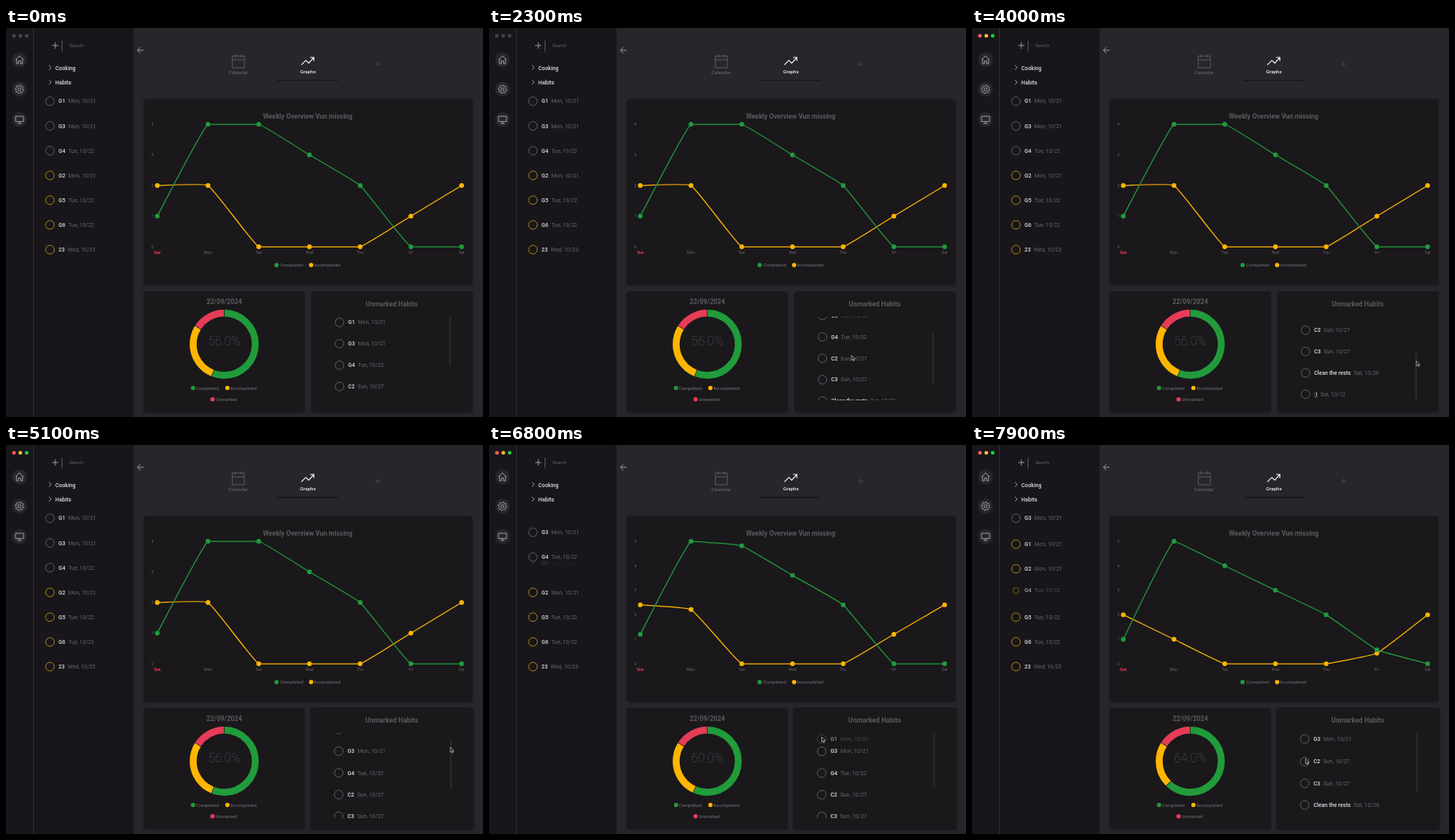
Recreate the animation shown at these times as an HTML page. Size 600 by 489 pixels, loop 8 s.

```html
<!DOCTYPE html>
<html lang="en">
<head>
<meta charset="utf-8">
<title>Habit graphs</title>
<style>
  html, body { margin: 0; width: 100%; height: 100%; overflow: hidden; background: #28262b; }
  svg { display: block; width: 100vw; height: 100vh; font-family: Roboto, Inter, sans-serif; }
  .row { font-size: 6.9px; fill: #67656a; }
  .name { font-weight: 500; fill: #dedde0; }
  .title { font-size: 8.4px; font-weight: 700; fill: #5b595d; text-anchor: middle; }
  .legend { font-size: 5.9px; font-weight: 500; fill: #626065; }
  .tick { font-size: 5px; fill: #68666b; }
  .pct { font-size: 15.6px; font-weight: 100; fill: #5a585d; text-anchor: middle; }
  .icon { fill: none; stroke: #b9b8bc; stroke-width: .8; }
  .dim { stroke: #69676c; }
</style>
</head>
<body>
<svg viewBox="0 0 600 489" preserveAspectRatio="none">
  <defs>
    <clipPath id="listClip"><rect x="400" y="363" width="175" height="105"/></clipPath>
    <filter id="shade" x="-5%" y="-5%" width="110%" height="112%" color-interpolation-filters="sRGB">
      <feDropShadow dx="0" dy="1" stdDeviation="1.5" flood-color="#000" flood-opacity=".25"/>
    </filter>
  </defs>
  <g id="base"></g>
  <g id="live"></g>
</svg>
<script>
const LOOP = 8000;
const GREEN = '#219b3b', YELLOW = '#ffb602', RED = '#e63c58', PANEL = '#1a181b';
const CHECKS = [6750, 7710];

// Chart data before, between and after the two checks
const STAGES = [
  { max: 4, done: [1, 4, 4, 3, 2, 0, 0], open: [2, 2, 0, 0, 0, 1, 2], pct: 56, thumb: 62.5 },
  { max: 5, done: [1, 5, 4, 3, 2, 0, 0], open: [2, 1, 0, 0, 0, 1, 2], pct: 60, thumb: 70 },
  { max: 5, done: [1, 5, 4, 3, 2, 1, 0], open: [2, 1, 0, 0, 0, 0, 2], pct: 64, thumb: 73.5 }
];
const SIDE = ['G1 G3 G4 G2 G5 G6 23', 'G3 G4 G1 G2 G5 G6 23', 'G3 G1 G2 G4 G5 G6 23'].map(s => s.split(' '));
const OPEN_COUNT = [3, 2, 1];
const TODO = ['G1', 'G3', 'G4', 'C2', 'C3', 'Clean the rests', ':)'];
const CHECKED = ['G1', 'G4'];
const DATES = {
  G1: 'Mon, 10/21', G2: 'Mon, 10/21', G3: 'Mon, 10/21', G4: 'Tue, 10/22', G5: 'Tue, 10/22',
  G6: 'Tue, 10/22', 23: 'Wed, 10/23', C2: 'Sun, 10/27', C3: 'Sun, 10/27',
  'Clean the rests': 'Sat, 10/26', ':)': 'Sat, 10/12'
};

// Steps: time, then values
const POINTER = [
  [450, 440, 492], [1250, 456, 411.5], [2950, 456, 411.5], [3600, 559, 418.5], [4600, 559, 418.5],
  [5200, 559, 377], [5400, 559, 377], [5850, 454.5, 387], [6150, 454.5, 387], [6550, 418.5, 367],
  [6800, 418.5, 367], [7150, 421.5, 388], [7450, 419.5, 394.5]
];
const SCROLL = [
  [1900, 0], [2100, 14], [2300, 35.5], [2600, 58], [2900, 69], [3100, 71], [4600, 71], [5200, 0]
];
const HOVER = [[4550, 1], [4700, 1.0148]];

const clamp = (v, lo = 0, hi = 1) => Math.min(hi, Math.max(lo, v));
const mix = (a, b, p) => a + (b - a) * p;
const smooth = p => p * p * (3 - 2 * p);
const quart = p => 1 - (1 - p) ** 4;
const cubic = p => 1 - (1 - p) ** 3;

function track(steps, t, ease = p => p) {
  const i = steps.findIndex(s => s[0] > t);
  if (i === 0) return steps[0].slice(1);
  if (i < 0) return steps[steps.length - 1].slice(1);
  const [a, b] = [steps[i - 1], steps[i]];
  const p = ease((t - a[0]) / (b[0] - a[0]));
  return a.slice(1).map((v, k) => mix(v, b[k + 1], p));
}

const text = (x, y, str, cls, extra = '') => `<text x="${x}" y="${y}" class="${cls}" ${extra}>${str}</text>`;
const path = (d, cls = 'icon', extra = '') => `<path d="${d}" class="${cls}" ${extra}/>`;
const dot = (x, y, r, fill) => `<circle cx="${x}" cy="${y}" r="${r}" fill="${fill}"/>`;
const ring = (x, y, r, color) =>
  `<circle cx="${x}" cy="${y}" r="${r}" fill="none" stroke="${color}" stroke-width=".8"/>`;
const box = (x, y, w, h, fill, extra = '') =>
  `<rect x="${x}" y="${y}" width="${w}" height="${h}" fill="${fill}" ${extra}/>`;
const card = (x, y, w, h) => box(x, y, w, h, PANEL, 'rx="4" filter="url(#shade)"');
const legend = (x, y, gap, str, color) => dot(x, y, 2.7, color) + text(x + gap, y + 2, str, 'legend');

function row(x, y, name, color, r = 5.4, alpha = 1) {
  const label = `<tspan class="name">${name}</tspan><tspan dx="3.7">${DATES[name]}</tspan>`;
  return `<g opacity="${alpha}">${ring(x, y, r, color)}${text(x + 10.7, y + 2.4, label, 'row')}</g>`;
}

function gear(cx, cy) {
  const pts = [];
  for (let i = 0; i < 32; i++) {
    const r = i % 4 < 2 ? 5.4 : 4.1, a = (i + .5) * Math.PI / 16;
    pts.push(`${(cx + r * Math.cos(a)).toFixed(2)} ${(cy + r * Math.sin(a)).toFixed(2)}`);
  }
  return path(`M${pts.join('L')}Z`) + `<circle cx="${cx}" cy="${cy}" r="1.9" class="icon"/>`;
}

function drawBase() {
  return box(0, 0, 600, 489, '#28262b')
    + box(0, 0, 160.5, 489, '#18161a') + box(34, 0, 1, 489, '#302e33') + box(160, 0, 1, 489, '#222025')
    + [40, 77, 115].map(y => dot(17, y, 9.4, '#28262b')).join('')
    + path('M12 40L17 35L22 40M13.2 39V45H15.6V41.5H18.4V45H20.8V39')
    + gear(17, 77)
    + path('M12 111H22V117.6H12ZM17 117.6V120M14.5 120H19.5')
    + path('M58 22H66M62 18V26') + path('M70.5 16V29.5', 'icon dim')
    + text(79.5, 24.3, 'Search', 'legend', 'style="font-weight:400"')
    + [['Cooking', 50], ['Habits', 68.5]].map(([s, y]) =>
        path(`M54 ${y - 3.2}L57 ${y - .4}L54 ${y + 2.4}`) + text(62, y + 2.8, s, 'row name')).join('')
    + path('M173 28H165.5M169 24.3L165.3 28L169 31.7')
    + path('M284.7 35.2H299.8V50H284.7ZM284.7 40H299.8M288.5 33V37M296 33V37', 'icon dim')
    + text(292, 58.3, 'Calendar', 'legend', 'text-anchor="middle" style="font-size:6.1px"')
    + path('M371.5 46.3L377.2 40.7L380.8 44.2L387 37.3M382.6 37H387.2V41.6', 'icon', 'style="stroke:#fff;stroke-width:1.1"')
    + text(379.8, 57.3, 'Graphs', 'legend', 'text-anchor="middle" style="font-size:6.1px;fill:#f0f0f2"')
    + box(341, 65.5, 77, 1, '#111013')
    + path('M464 45.3H471M467.5 41.8V48.8', 'icon', 'style="stroke:#4d4b50"')
    + card(173, 89.5, 414, 233.5) + card(173, 331, 203, 152)
    + text(379.5, 114.3, 'Weekly Overview Vun missing', 'title')
    + text(274.5, 346.5, '22/09/2024', 'title')
    + legend(340.3, 298, 4.7, 'Completed', GREEN) + legend(383.8, 298, 3.9, 'Incompleted', YELLOW)
    + legend(235.2, 452.5, 3.6, 'Completed', GREEN) + legend(278.5, 452.5, 3.9, 'Incompleted', YELLOW)
    + legend(259.8, 466.8, 3.9, 'Unmarked', RED);
}

const TOP = 121, BOTTOM = 275;
const plotX = i => 190.3 + 63.8 * i;
const plotY = (v, max) => BOTTOM - v / max * (BOTTOM - TOP);

// Spline with handles held inside the plot area
function spline(pts, tension = .1) {
  const handles = pts.map((p, i) => {
    const a = pts[Math.max(0, i - 1)], b = pts[Math.min(pts.length - 1, i + 1)];
    const d1 = Math.hypot(p[0] - a[0], p[1] - a[1]), d2 = Math.hypot(b[0] - p[0], b[1] - p[1]);
    const at = (k, sign) => [
      p[0] + sign * k * (b[0] - a[0]),
      clamp(p[1] + sign * k * (b[1] - a[1]), TOP, BOTTOM)
    ];
    return [at(tension * d1 / (d1 + d2), -1), at(tension * d2 / (d1 + d2), 1)];
  });
  return pts.slice(1).reduce((d, p, i) => `${d}C${handles[i][1]} ${handles[i + 1][0]} ${p}`, `M${pts[0]}`);
}

function drawChart(from, to, p) {
  const line = (key, color) => {
    const pts = to[key].map((v, i) =>
      [plotX(i), mix(plotY(from[key][i], from.max), plotY(v, to.max), p)]);
    return path(spline(pts), '', `fill="none" stroke="${color}" stroke-width="1.25"`)
      + pts.map(([x, y]) => dot(x, y, 2.95, color)).join('');
  };
  let out = box(190, 274.7, 383, .6, '#111013');
  for (let v = 0; v <= to.max; v++)
    out += text(185.6, plotY(v, to.max) + 1.7, v, 'tick', 'text-anchor="end"');
  ['Sun', 'Mon', 'Tue', 'Wed', 'Thu', 'Fri', 'Sat'].forEach((day, i) => {
    const look = i ? '' : `style="fill:${RED};font-weight:700"`;
    out += text(plotX(i), 284, day, 'tick', `text-anchor="middle" ${look}`);
  });
  return out + line('open', YELLOW) + line('done', GREEN);
}

function drawDonut(from, to, p) {
  const split = mix(from.pct, to.pct, p);
  const arc = (a, b, color) => `<circle cx="274.5" cy="397.5" r="39.1" fill="none" stroke="${color}"
    stroke-width="8.7" pathLength="100" stroke-dasharray="${b - a - .3} 100"
    stroke-dashoffset="${-a - .15}" transform="rotate(-90 274.5 397.5)"/>`;
  return arc(0, split, GREEN) + arc(split, 84, YELLOW) + arc(84, 100, RED)
    + text(274.5, 398.6, to.pct.toFixed(1) + '%', 'pct');
}

function drawSide(stage, dt) {
  const slot = i => 92 + 31.1 * i;
  const before = SIDE[Math.max(0, stage - 1)];
  return SIDE[stage].map((name, i) => {
    const color = i < OPEN_COUNT[stage] ? '#6f6d72' : '#d59d16';
    if (stage && name === CHECKED[stage - 1]) {
      const s = clamp(dt / 280);
      return row(55.3, slot(i) - 7 * (1 - s), name, color, 5.4 * s, s);
    }
    return row(55.3, mix(slot(before.indexOf(name)), slot(i), cubic(clamp(dt / 300))), name, color);
  }).join('');
}

function drawList(stage, dt, t) {
  const [scroll] = track(SCROLL, t);
  const [zoom] = track(HOVER, t);
  const slide = cubic(clamp(dt / 300));
  const slot = i => 370 + 26.9 * i - scroll;
  const left = n => TODO.filter(name => !CHECKED.slice(0, n).includes(name));
  const now = left(stage), before = left(Math.max(0, stage - 1));
  let rows = now.map((name, i) =>
    row(419.5, mix(slot(before.indexOf(name)), slot(i), slide), name, '#6f6d72')).join('');
  if (stage && dt < 120) {
    const name = CHECKED[stage - 1];
    rows += row(419.5, slot(before.indexOf(name)), name, '#6f6d72', 5.4, 1 - dt / 120);
  }
  const thumb = mix(STAGES[Math.max(0, stage - 1)].thumb, STAGES[stage].thumb, slide);
  return `<g transform="translate(485.5 407) scale(${zoom}) translate(-485.5 -407)">`
    + card(384, 331, 203, 152) + text(485.2, 349.8, 'Unmarked Habits', 'title')
    + `<g clip-path="url(#listClip)">${rows}</g>`
    + box(557.6, 363 + scroll * .6, 2, thumb, '#2d2b30', 'rx="1"') + '</g>';
}

function drawPointer(t) {
  if (t < POINTER[0][0]) return '';
  const [x, y] = track(POINTER, t, smooth);
  return `<path transform="translate(${x} ${y})" d="M0 0V6.2L1.5 4.9L2.5 7.1L3.5 6.6L2.5 4.5H4.4Z"
    fill="#111" stroke="#d8d8da" stroke-width=".65" stroke-linejoin="round"/>`;
}

function drawLive(t) {
  const stage = CHECKS.filter(c => t >= c).length;
  const dt = stage ? t - CHECKS[stage - 1] : 0;
  const from = STAGES[Math.max(0, stage - 1)], to = STAGES[stage];
  const p = quart(clamp(dt / 1000));
  const lights = t < 3800 ? ['#454348', '#454348', '#454348'] : ['#ff5f57', '#febc2e', '#28c840'];
  return lights.map((c, i) => dot(10 + 8 * i, 9.8, 2.4, c)).join('')
    + drawSide(stage, dt) + drawChart(from, to, p) + drawDonut(from, to, p)
    + drawList(stage, dt, t) + drawPointer(t);
}

const live = document.getElementById('live');
document.getElementById('base').innerHTML = drawBase();

function tick() {
  live.innerHTML = drawLive(performance.now() % LOOP);
  requestAnimationFrame(tick);
}
tick();
</script>
</body>
</html>
```
